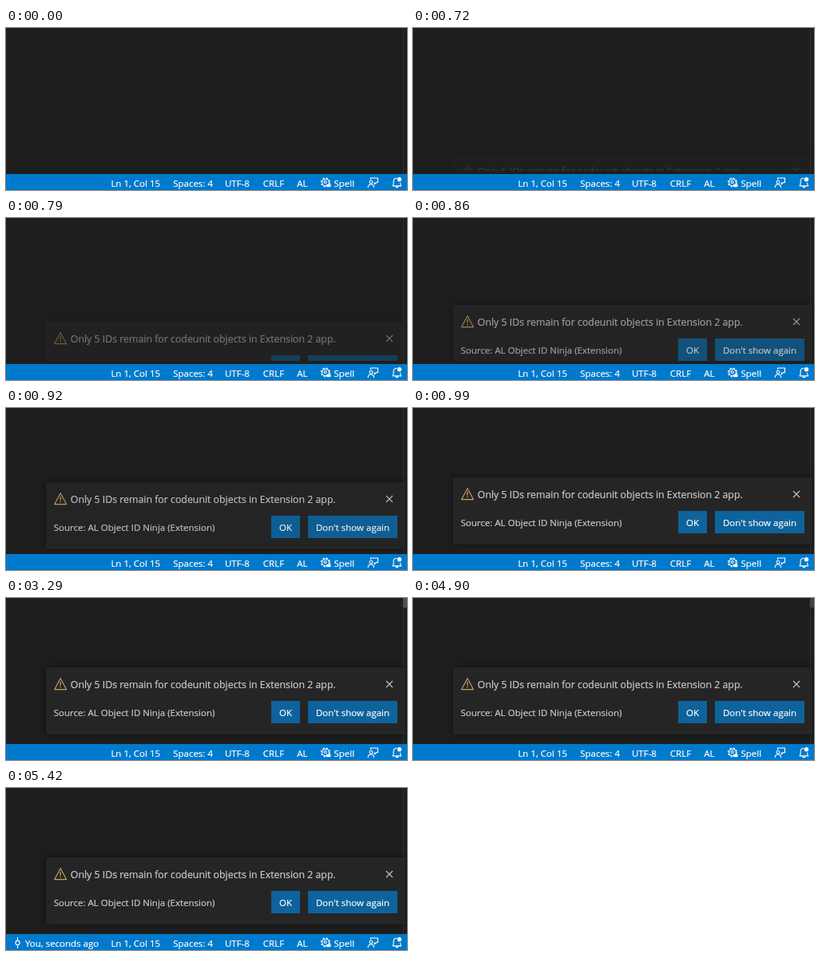
An HTML page for the animation above (7.34 s loop, 502 by 203 pixels).

```html
<!DOCTYPE html>
<html lang="en">
<head>
<meta charset="utf-8">
<title>Notification toast</title>
<style>
  html, body { margin: 0; width: 100%; height: 100%; overflow: hidden; background: #1e1e1e; }
  svg { display: block; width: 502px; height: 203px; }
  text { font: 11.5px "Open Sans", "Noto Sans", sans-serif; fill: #fff; stroke: #fff; stroke-width: .2; }
  #toast text { fill: #ccc; stroke: #ccc; }
  #toast .button { fill: #fff; stroke: #fff; }
  #toast .message { font-size: 12.34px; }
  .panel { fill: #252526; filter: drop-shadow(0 0 4px rgba(0, 0, 0, .5)); }
  .icon { fill: none; stroke: #fff; stroke-width: 1.1; stroke-linejoin: round; }
</style>
</head>
<body>
<svg viewBox="0 0 502 203">
  <clipPath id="area"><rect x="42" width="460" height="179"/></clipPath>
  <rect width="502" height="203" fill="#1e1e1e"/>
  <rect x="497" width="1" height="183" fill="#303030"/>
  <rect id="thumb" x="497" width="5" height="12"/>

  <g clip-path="url(#area)">
    <g id="toast">
      <rect class="panel" x="50" y="87" width="450" height="84"/>
      <g class="icon" style="stroke:#cba45c">
        <path d="M68.2 100.7 75.6 114.6H60.8Z"/>
        <path d="M68.2 105v4.6m0 1.2v1.4" stroke-width="1.3"/>
      </g>
      <text class="message" x="80.8" y="113">Only 5 IDs remain for codeunit objects in Extension 2 app.</text>
      <path class="icon" style="stroke:#c5c5c5" d="M476 104l8 8m0-8l-8 8"/>
      <text x="59.8" y="148.4">Source: AL Object ID Ninja (Extension)</text>
      <path d="M332 129h36v28h-36zM378 129h112v28H378z" fill="#0e639c"/>
      <text class="button" x="350" y="148" text-anchor="middle">OK</text>
      <text class="button" x="434" y="148" text-anchor="middle">Don't show again</text>
    </g>
  </g>

  <rect y="183" width="502" height="20" fill="#007acc"/>
  <g id="blame">
    <path class="icon" d="M14.5 187v4.5m0 5v4.5"/>
    <circle class="icon" cx="14.5" cy="194" r="2.6"/>
    <text x="24" y="199">You, seconds ago</text>
  </g>
  <g id="status"></g>
  <g class="icon">
    <circle cx="400" cy="193.5" r="4.3"/>
    <circle cx="400" cy="193.5" r="5.4" stroke-width="1.4" stroke-dasharray="2.12"/>
    <circle cx="399.7" cy="193" r="1.5"/>
    <path d="M401 197.5h5.5" stroke-width="3.4"/>
    <path d="M456.5 190v-2h9v5.6h-2l-2.3 2.2v-2.2"/>
    <circle cx="457" cy="193.2" r="1.9"/>
    <path d="M453.2 200c0-5.4 7.4-5.4 7.4 0"/>
    <path d="M489.3 188.2c-2.8 0-4.2 1.8-4.2 4.2v3.2l-1 2.3h10.6l-1-2.3v-1.8M488 198.2c0 2.2 3 2.2 3 0"/>
    <circle cx="492.5" cy="189.8" r="2.7" fill="#fff" stroke="none"/>
  </g>
</svg>
<script>
  const LOOP = 7340;
  const byId = id => document.getElementById(id);
  const [toast, thumb, blame] = ["toast", "thumb", "blame"].map(byId);

  const labels = [[131.4, "Ln 1, Col 15"], [209.2, "Spaces: 4"], [274, "UTF-8"],
    [321.8, "CRLF"], [364.2, "AL"], [410.5, "Spell"]];
  byId("status").innerHTML = labels
    .map(([x, label]) => `<text x="${x}" y="199">${label}</text>`).join("");

  // Value of the latest [start, value] step reached at time t
  const stepAt = (steps, t) => steps.filter(([start]) => t >= start).pop()[1];

  const reveal = [[0, 0], [720, .16], [790, .49], [860, .74], [920, .93], [990, 1]];
  const thumbFill = [[0, "none"], [3290, "#4f4f4f"], [4900, "#424242"], [5420, "none"]];

  function draw() {
    const t = performance.now() % LOOP;
    const shown = stepAt(reveal, t);
    toast.setAttribute("transform", `translate(0 ${Math.round(84 * (1 - shown))})`);
    toast.setAttribute("opacity", shown);
    thumb.setAttribute("fill", stepAt(thumbFill, t));
    blame.setAttribute("visibility", t >= 5300 ? "visible" : "hidden");
    requestAnimationFrame(draw);
  }
  draw();
</script>
</body>
</html>
```
